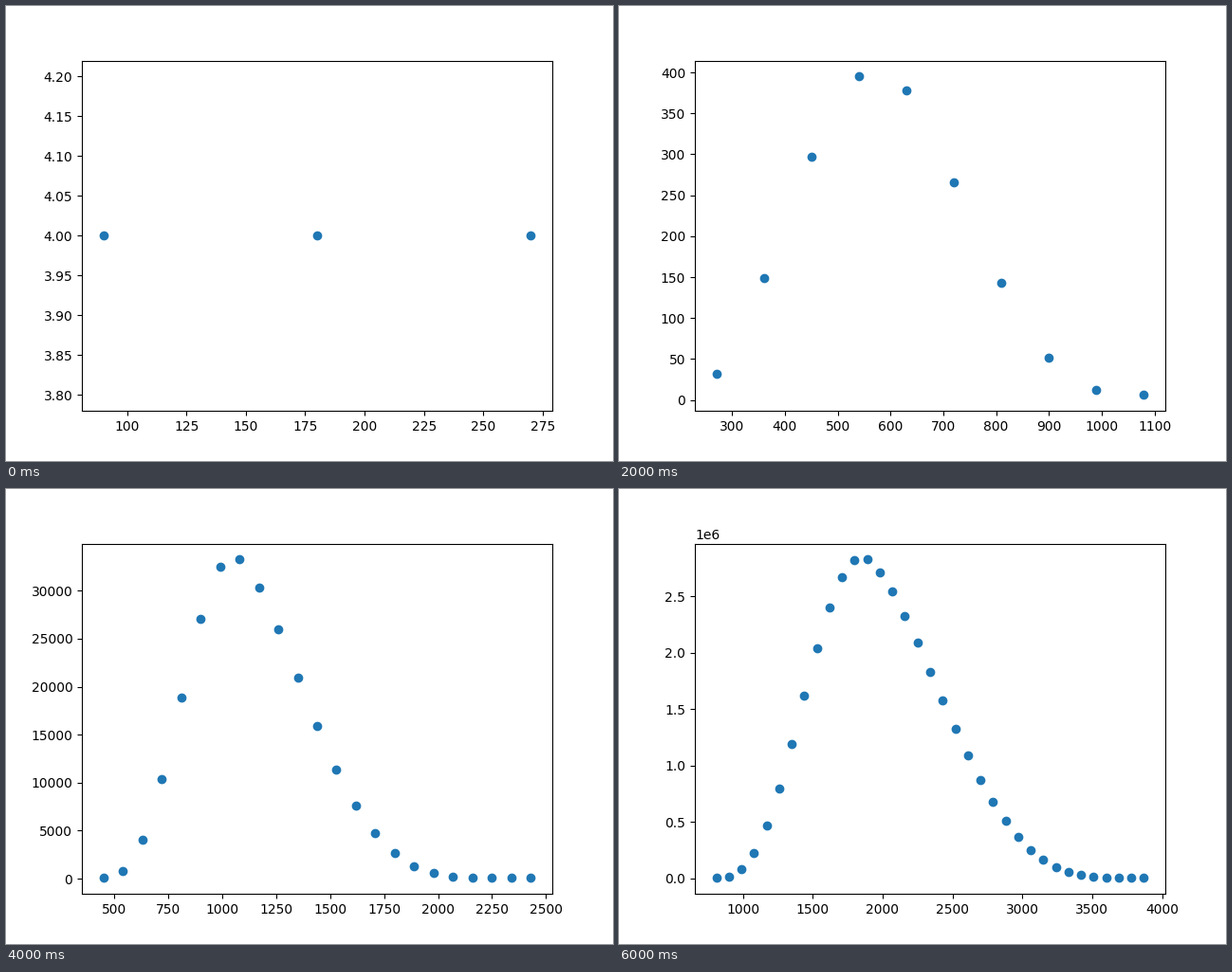
Animation, 640 px wide and 480 px high, one loop 7000 ms. Source, as a matplotlib script:

```python
import math

import numpy as np
import matplotlib.pyplot as plt
from matplotlib.animation import FuncAnimation

STEP = 90  # degrees per quarter turn

# Key points of each curve: start, rising half height, peak, falling half
# height and end (in quarter turns), then the lowest and highest count.
CURVES = [
    (1, 1.5, 2, 2.5, 3, 4, 4),
    (1.05, 2.71, 4, 5.53, 7, 3, 47),
    (2.2, 4.38, 6.45, 8.47, 12, 6, 395),
    (3.5, 6.46, 8.83, 11.68, 19, 12, 3722),
    (4.5, 8.77, 11.65, 15.81, 27, 60, 33_250),
    (6.6, 11.62, 16.1, 20.7, 36, 300, 305_000),
    (8.5, 15.55, 20.55, 27.6, 43, 2000, 2_826_000),
]

fig, ax = plt.subplots(figsize=(6.4, 4.8), dpi=100)


def flank(x, peak, half, foot, power):
    """Fall from 1 at the peak through 0.5 at half to 0 at the foot."""
    u = np.clip((x - peak) / (foot - peak), 0, 1)
    u_half = (half - peak) / (foot - peak)
    fall = math.log(0.5) / math.log(1 - u_half ** power)
    return (1 - u ** power) ** fall


def histogram(i):
    start, rise, peak, drop, end, low, high = CURVES[i]
    turns = np.arange(math.ceil(start), end + 1)
    power = 0.55 * min(i + 1, 3)  # short sequences have pointed peaks
    shape = (flank(turns, peak, rise, start, 1.2 * power)
             * flank(turns, peak, drop, end, power))
    counts = low + (high - low) * shape / shape.max()
    return STEP * turns, np.round(counts)


def draw(i):
    ax.clear()
    ax.scatter(*histogram(i))


anim = FuncAnimation(fig, draw, frames=len(CURVES), init_func=lambda: None,
                     interval=1000, repeat=True, repeat_delay=0)
plt.show()
```
